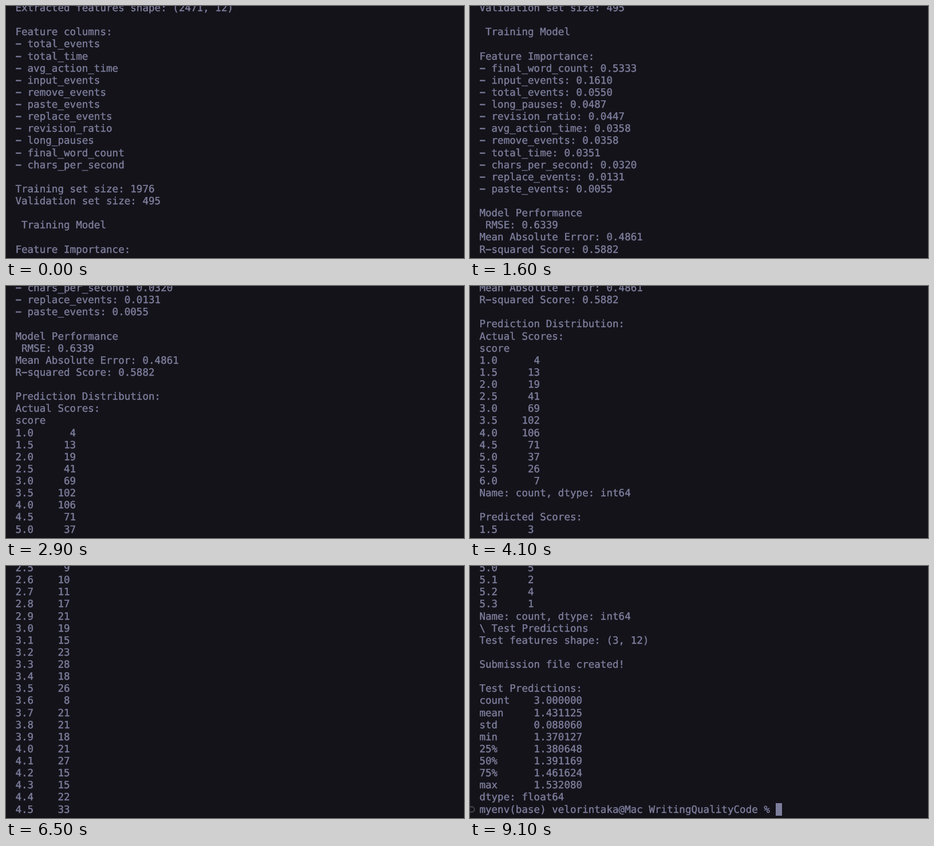
Animation of 800 by 441 pixels, one loop 9200 ms. Source, as an HTML page:

```html
<!DOCTYPE html>
<html lang="en">
<head>
<meta charset="utf-8">
<title>Terminal output</title>
<style>
  html, body { margin: 0; width: 100%; height: 100%; overflow: hidden; background: #14131a; }
  svg { display: block; width: 800px; height: 441px; }
  text {
    font: 17.57px "DejaVu Sans Mono", monospace;
    fill: #7d7e9c;
    stroke: #7d7e9c;
    stroke-width: 0.4px;
    white-space: pre;
    text-rendering: geometricPrecision;
  }
</style>
</head>
<body>
<svg viewBox="0 0 800 441">
  <rect width="800" height="441" fill="#14131a"/>
  <g id="log"></g>
  <rect y="439" width="800" height="2" fill="#14131a"/>
  <rect y="440" width="800" height="1" fill="#0f0b10"/>
</svg>
<script>
const LOOP = 9200, TICK = 100;
const LEFT = 16.4, BASE = 9, ROW = 21.13;
const NS = "http://www.w3.org/2000/svg";

// [time in ms, index of the top line]
const SCROLL = [
  [0, 0], [200, 2], [300, 2], [400, 4], [2900, 29], [3300, 32], [4300, 36],
  [5000, 43], [6500, 62], [7200, 68], [7300, 68], [7800, 73], [9100, 87]
];

const bullets = list => list.split("|").map(s => "\u2212 " + s);
const counts = (labels, values, width) =>
  values.split(" ").map((v, i) => labels(i).toFixed(1) + v.padStart(width));
const stats = list => list.split("|").map(s => {
  const [key, value] = s.split(" ");
  return key.padEnd(9) + value;
});

const lines = [
  "Extracted features shape: (2471, 12)",
  "",
  "Feature columns:",
  ...bullets("total_events|total_time|avg_action_time|input_events|remove_events|" +
    "paste_events|replace_events|revision_ratio|long_pauses|final_word_count|chars_per_second"),
  "",
  "Training set size: 1976",
  "Validation set size: 495",
  "",
  " Training Model",
  "",
  "Feature Importance:",
  ...bullets("final_word_count: 0.5333|input_events: 0.1610|total_events: 0.0550|" +
    "long_pauses: 0.0487|revision_ratio: 0.0447|avg_action_time: 0.0358|" +
    "remove_events: 0.0358|total_time: 0.0351|chars_per_second: 0.0320|" +
    "replace_events: 0.0131|paste_events: 0.0055"),
  "",
  "Model Performance",
  " RMSE: 0.6339",
  "Mean Absolute Error: 0.4861",
  "R\u2212squared Score: 0.5882",
  "",
  "Prediction Distribution:",
  "Actual Scores:",
  "score",
  ...counts(i => 1 + i / 2, "4 13 19 41 69 102 106 71 37 26 7", 7),
  "Name: count, dtype: int64",
  "",
  "Predicted Scores:",
  ...counts(i => i < 2 ? 1.5 + i * 0.2 : 1.8 + i / 10,
    "3 1 1 2 6 3 8 9 10 11 17 21 19 15 23 28 18 26 8 21 21 18 21 27 " +
    "15 15 22 33 26 18 9 8 5 2 4 1", 6),
  "Name: count, dtype: int64",
  "\\ Test Predictions",
  "Test features shape: (3, 12)",
  "",
  "Submission file created!",
  "",
  "Test Predictions:",
  ...stats("count 3.000000|mean 1.431125|std 0.088060|min 1.370127|25% 1.380648|" +
    "50% 1.391169|75% 1.461624|max 1.532080"),
  "dtype: float64",
  "myenv(base) velorintaka@Mac WritingQualityCode % "
];

const log = document.getElementById("log");

function add(tag, attrs, content = "") {
  const el = document.createElementNS(NS, tag);
  for (const key in attrs) el.setAttribute(key, attrs[key]);
  el.textContent = content;
  log.append(el);
}

lines.forEach((line, i) => {
  if (line) add("text", { x: LEFT, y: (BASE + i * ROW).toFixed(2) }, line);
});

// Prompt marker and block cursor sit on the last line.
const promptY = BASE + (lines.length - 1) * ROW;
add("circle", { cx: 3, cy: promptY - 5.6, r: 4.7, fill: "none", stroke: "#5a5a62", "stroke-width": 1.4 });
add("rect", { x: 534, y: promptY - 16.6, width: 11, height: 22, fill: "#7d7e9c" });

function topLine(t) {
  const i = SCROLL.findIndex(([end]) => t <= end);
  if (i <= 0) return SCROLL[0][1];
  const [t0, a] = SCROLL[i - 1], [t1, b] = SCROLL[i];
  return Math.round(a + (b - a) * (t - t0) / (t1 - t0));
}

const start = performance.now();

function draw() {
  const elapsed = Math.max(0, performance.now() - start) % LOOP;
  const top = topLine(Math.floor(elapsed / TICK) * TICK);
  log.setAttribute("transform", `translate(0 ${(-top * ROW).toFixed(2)})`);
  requestAnimationFrame(draw);
}
draw();
</script>
</body>
</html>
```
